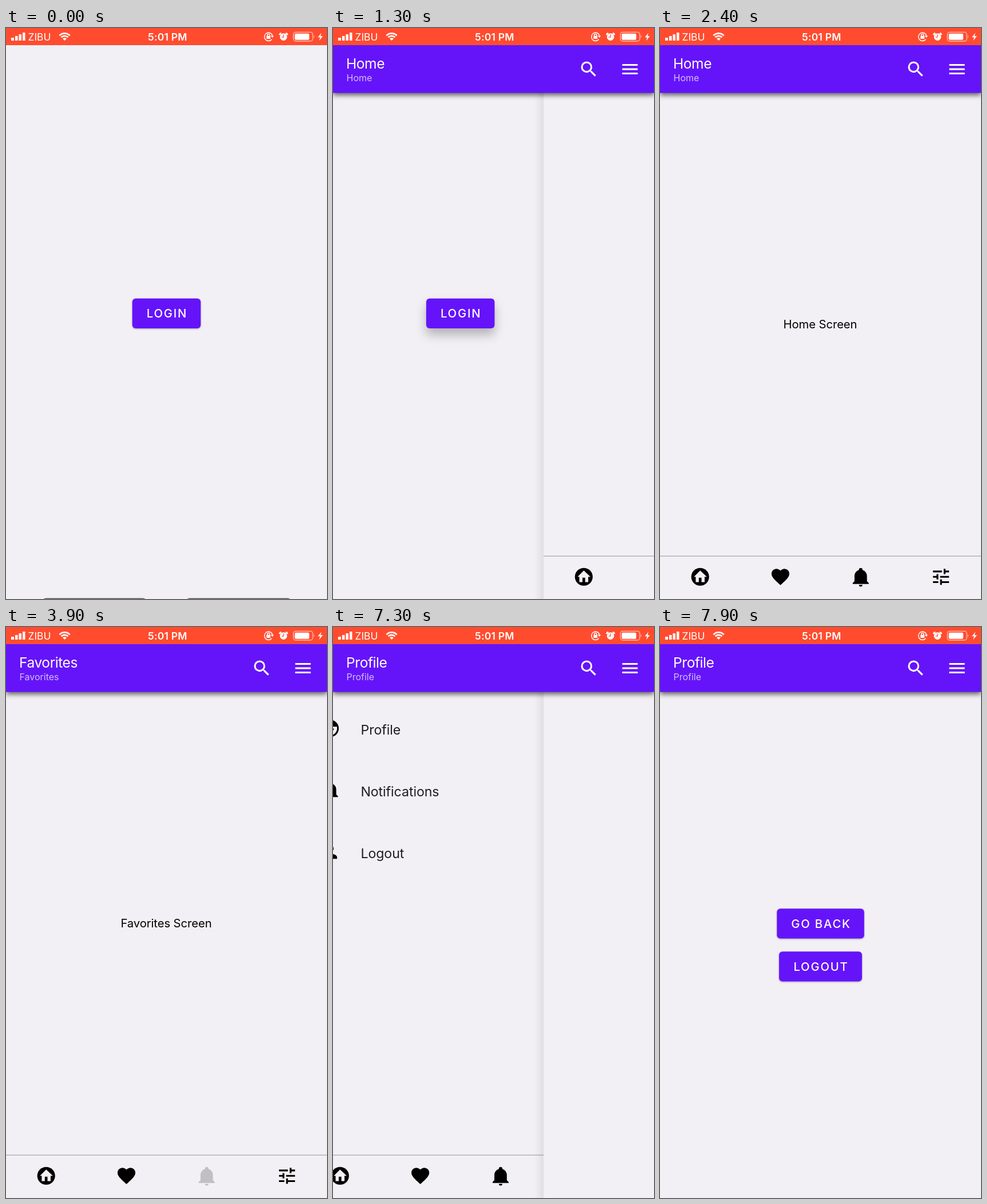
Animation, 561 px wide and 998 px high, one loop 8 s. Source, as an HTML page:

```html
<!DOCTYPE html>
<html lang="en">
<head>
<meta charset="utf-8">
<title>App navigation</title>
<style>
  html, body { margin: 0; width: 100%; height: 100%; overflow: hidden; background: #f2f0f4; }
  svg { display: block; width: 100%; height: 100%; font-family: Inter, sans-serif; }
  .page { fill: #f2f0f4; }
  .purple { fill: #6514fa; }
  .middle { text-anchor: middle; }
  .label { font-size: 20.3px; letter-spacing: -.1px; }
  .row { font-size: 23.2px; letter-spacing: -.1px; fill: #1f1e20; }
  .button { filter: drop-shadow(0 1px 1.5px rgba(0, 0, 0, .3)); }
  .button.raised { filter: drop-shadow(0 11px 9px rgba(0, 0, 0, .26)); }
  .button text { fill: #fff; font-size: 20.3px; font-weight: 500; letter-spacing: 1.8px; text-anchor: middle; }
  .appbar { filter: drop-shadow(0 4px 4.5px rgba(0, 0, 0, .6)); }
</style>
</head>
<body>
<svg viewBox="0 0 561 998" preserveAspectRatio="none">
  <defs>
    <!-- Icons are drawn on a 24-unit grid centred on the origin -->
    <g id="home"><circle r="10"/><path class="page" transform="translate(-12 -12)" d="M17 12v6h-3.5v-5h-3v5H7v-6H5l7-7 7.5 7z"/></g>
    <path id="heart" transform="translate(-12 -12)" d="M12 21.35l-1.45-1.32C5.4 15.36 2 12.27 2 8.5 2 5.41 4.42 3 7.5 3c1.74 0 3.41.81 4.5 2.08C13.09 3.81 14.76 3 16.5 3 19.58 3 22 5.41 22 8.5c0 3.77-3.4 6.86-8.55 11.53z"/>
    <path id="bell" transform="translate(-12 -12)" d="M21 19v1H3v-1l2-2v-6c0-3.1 2.03-5.83 5-6.71V4a2 2 0 0 1 4 0v.29c2.97.88 5 3.61 5 6.71v6zM14 21a2 2 0 0 1-4 0z"/>
    <path id="tune" transform="translate(-12 -12)" d="M3 17v2h6v-2zM3 5v2h10V5zm10 16v-2h8v-2h-8v-2h-2v6zM7 9v2H3v2h4v2h2V9zm14 4v-2H11v2zm-6-4h2V7h4V5h-4V3h-2z"/>
    <path id="face" fill-rule="evenodd" transform="translate(-12 -12)" d="M7.75 13a1.25 1.25 0 0 1 2.5 0 1.25 1.25 0 0 1-2.5 0zm6 0a1.25 1.25 0 0 1 2.5 0 1.25 1.25 0 0 1-2.5 0zM12 2a10 10 0 0 0 0 20 10 10 0 0 0 0-20zm0 18c-4.41 0-8-3.59-8-8 0-.29 0-.58.05-.86 2.36-1.05 4.23-2.98 5.21-5.37a9.97 9.97 0 0 0 10.41 3.97c.21.71.33 1.47.33 2.26 0 4.41-3.59 8-8 8z"/>
    <path id="account" transform="translate(-12 -12)" d="M12 4a4 4 0 0 1 0 8 4 4 0 0 1 0-8zm0 10c4.42 0 8 1.79 8 4v2H4v-2c0-2.21 3.58-4 8-4z"/>
    <path id="search" fill-rule="evenodd" transform="translate(-12 -12)" d="M9.5 3A6.5 6.5 0 0 1 16 9.5c0 1.61-.59 3.09-1.56 4.23l.27.27h.79l5 5-1.5 1.5-5-5v-.79l-.27-.27A6.5 6.5 0 0 1 3 9.5 6.5 6.5 0 0 1 9.5 3zm0 2a4.5 4.5 0 0 0 0 9 4.5 4.5 0 0 0 0-9z"/>
    <path id="menu" transform="translate(-12 -12)" d="M3 6h18v2H3zm0 5h18v2H3zm0 5h18v2H3z"/>
    <linearGradient id="edge"><stop stop-opacity="0"/><stop offset="1" stop-opacity=".075"/></linearGradient>
    <g id="card">
      <rect x="-16" width="16" height="998" fill="url(#edge)"/>
      <rect class="page" width="561" height="998"/>
    </g>
  </defs>

  <rect class="page" width="561" height="998"/>
  <g id="login"></g>
  <g id="leftover" fill="#5a595c">
    <rect x="62" y="996.6" width="185" height="12" rx="9"/>
    <rect x="313" y="996.6" width="187" height="12" rx="9"/>
  </g>

  <g id="tabs">
    <use href="#card"/>
    <text id="tabText" class="label middle" x="280" y="525"></text>
    <g id="settings"></g>
    <path d="M0 923H561" stroke="#b3b1b6" stroke-width="1.4"/>
    <g id="tabIcons"></g>
  </g>

  <g id="profile"><use href="#card"/></g>

  <g id="header" fill="#fff">
    <rect class="purple appbar" y="30" width="561" height="83.5"/>
    <text id="title" x="23" y="71" font-size="24.6" letter-spacing="-.45"></text>
    <text id="subtitle" x="23.5" y="93" font-size="16" opacity=".72"></text>
    <use href="#search" transform="translate(447 72) scale(1.5)"/>
    <use href="#menu" transform="translate(519 72) scale(1.5)"/>
  </g>

  <g id="status" fill="#fff">
    <rect width="561" height="30" fill="#ff4c2f"/>
    <path d="M9 17h5v5h-5zM16 14h4.5v8H16zM22.5 11h4.5v11h-4.5zM29 8h4.5v14H29z"/>
    <text x="38.5" y="21.6" font-size="17.4">ZIBU</text>
    <g transform="translate(102.5 22)">
      <path d="M-9.1-8.8A12.6 12.6 0 0 1 9.1-8.8M-5.9-5.7A8.2 8.2 0 0 1 5.9-5.7" fill="none" stroke="#fff" stroke-width="2.7"/>
      <path d="M0 0L-3.4-3.3A4.8 4.8 0 0 1 3.4-3.3z"/>
    </g>
    <text class="middle" x="282.3" y="21.7" font-size="17.5" font-weight="600" letter-spacing=".2">5:01 PM</text>
    <g fill="none" stroke="#fff" stroke-width="1.5">
      <path d="M464.5 19.8A7.2 7.2 0 1 1 465.8 13.5"/>
      <path d="M456.7 14v-1.6a2 2 0 0 1 4 0V14"/>
      <path d="M480 9.6l-1.5 1.4M490 9.6l1.5 1.4" stroke-width="3" stroke-linecap="round"/>
    </g>
    <path d="M455.3 13.7h6.8v5.2h-6.8zM462.6 13.5h5.6l-2.8 3.6z"/>
    <circle cx="485" cy="15.6" r="6.3"/>
    <path d="M485 11.3v4.6h-3.4" fill="none" stroke="#ff4c2f" stroke-width="1.3"/>
    <rect x="502.3" y="7.4" width="33.8" height="15.6" rx="4" fill="none" stroke="#fff" stroke-width="1.3" opacity=".65"/>
    <rect x="504.6" y="9.7" width="25.4" height="11" rx="2"/>
    <path d="M537.8 12.3q2.4 2.9 0 5.8z" opacity=".65"/>
    <path d="M551.3 8.5l-6.3 7.7h4l-1.8 6 6.6-8h-4.2z"/>
  </g>
</svg>

<script>
const WIDTH = 561, LOOP = 8000, STEP = 100;
const PUSH_TABS = 1300, PUSH_PROFILE = 7300;
const $ = id => document.getElementById(id);

const button = (label, x, y, w) =>
  `<g class="button"><rect class="purple" x="${x}" y="${y}" width="${w}" height="52.3" rx="6"/>
   <text x="${x + w / 2 + 1}" y="${y + 33.6}">${label}</text></g>`;
const icon = (name, x, y, scale) =>
  `<use href="#${name}" transform="translate(${x} ${y}) scale(${scale})"/>`;

$('login').innerHTML = button('LOGIN', 220.7, 472.8, 119.6);
$('profile').innerHTML += button('GO BACK', 204.3, 492.3, 152.5) + button('LOGOUT', 208, 567.2, 145);
$('tabIcons').innerHTML = ['home', 'heart', 'bell', 'tune']
  .map((name, i) => icon(name, 70.2 + 140.3 * i, 959.2, 1.557)).join('');
$('settings').innerHTML = [['face', 'Profile'], ['bell', 'Notifications'], ['account', 'Logout']]
  .map(([name, label], i) => icon(name, 53, 177.3 + 108 * i, 1.5) +
    `<text class="row" x="106.3" y="${188 + 108 * i}">${label}</text>`).join('');

const tabs = [
  { name: 'Home', from: 0 },
  { name: 'Favorites', pressed: 3100, from: 3600 },
  { name: 'Notifications', pressed: 3900, from: 4500 },
  { name: 'Settings', pressed: 5200, from: 5800 },
];

// Critically damped spring, already 67 ms under way at its first visible step
function push(t, start) {
  if (t < start) return 0;
  const w = 18.26 * (t - start + 66.7) / 1000;
  return 1 - Math.exp(-w) * (1 + w);
}

const show = (id, on) => $(id).setAttribute('display', on ? 'inline' : 'none');
const slide = (id, x) => $(id).setAttribute('transform', `translate(${x} 0)`);

function render(t) {
  const toTabs = push(t, PUSH_TABS), toProfile = push(t, PUSH_PROFILE);
  const tab = tabs.filter(({ from }) => t >= from).pop().name;
  const title = t >= PUSH_PROFILE ? 'Profile' : tab;

  show('leftover', t < 100);
  show('header', t >= PUSH_TABS);
  show('tabs', t >= PUSH_TABS);
  show('profile', t >= PUSH_PROFILE);
  show('settings', tab === 'Settings');

  slide('login', -.3 * WIDTH * toTabs);
  slide('tabs', WIDTH * (1 - toTabs) - .3 * WIDTH * toProfile);
  slide('profile', WIDTH * (1 - toProfile));

  $('login').firstElementChild.classList.toggle('raised', t >= PUSH_TABS);
  $('title').textContent = $('subtitle').textContent = title;
  $('tabText').textContent = tab === 'Settings' ? '' : tab + ' Screen';
  tabs.forEach(({ pressed, from }, i) =>
    $('tabIcons').children[i].setAttribute('opacity', t >= pressed && t < from ? .2 : 1));
}

const begin = performance.now();
function tick() {
  const t = (performance.now() - begin) % LOOP;
  render(Math.floor(t / STEP) * STEP);
  requestAnimationFrame(tick);
}
tick();
</script>
</body>
</html>
```
